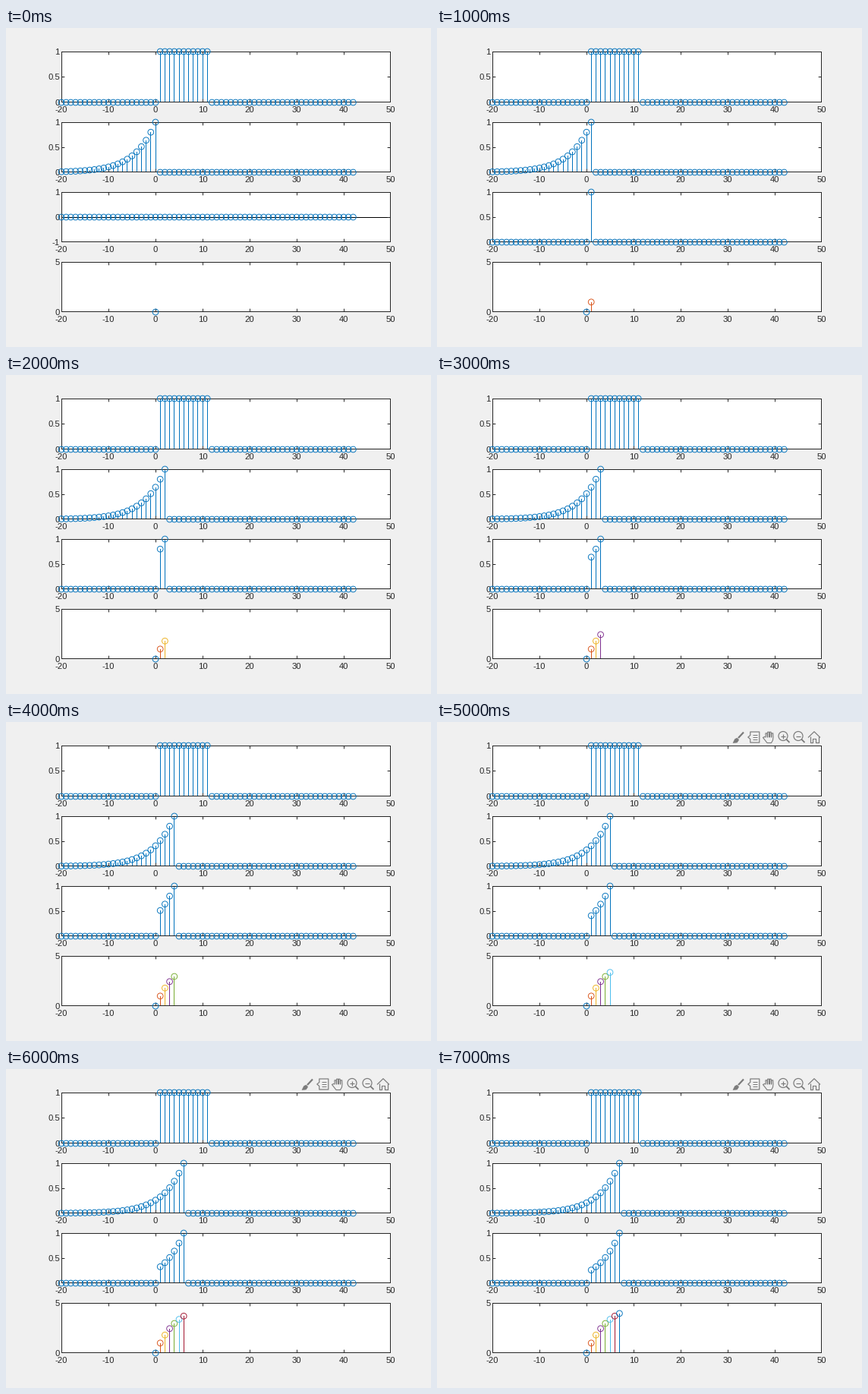
Recreate the animation shown at these times as a matplotlib script. Size 560 by 420 pixels, loop 8000 ms.

```python
import numpy as np
import matplotlib.pyplot as plt
from matplotlib.animation import FuncAnimation
from matplotlib.patches import Circle, Polygon, Rectangle

W, H, DPI = 560, 420, 100
PX = 72 / DPI                     # points per pixel
LEFT, RIGHT = 73, 507             # edges of every plot
STEP = (RIGHT - LEFT) / 70        # pixels per sample
HEIGHT, PITCH, FIRST = 66.22, 92.025, 31.49
TICK = 4.34
INK, BLUE, GRAY = "#262626", "#0072BD", "#7b7b7b"
CYCLE = (BLUE, "#D95319", "#EDB120", "#7E2F8E",
         "#77AC30", "#4DBEEE", "#A2142F")
N = np.arange(-20, 43)
PULSE = ((N >= 1) & (N <= 11)).astype(float)

fig = plt.figure(figsize=(W / DPI, H / DPI), dpi=DPI, facecolor="#f0f0f0")
ax = fig.add_axes([0, 0, 1, 1])


def to_x(n):
    return LEFT + (n + 20) * STEP


def cell(pos, last):
    """Whole pixel that holds a position, at most the last one."""
    return min(int(pos + 1e-6), last)


def box(x, y, w, h, color, z):
    ax.add_patch(Rectangle((x, y), w, h, fc=color, lw=0, snap=False, zorder=z))


def ring(x, y, r, color, width):
    ax.add_patch(Circle((x, y), r, fill=False, ec=color, lw=width * PX,
                        zorder=5))


def label(x, y, text, align):
    ax.text(x, y, text, ha=align, va="baseline", color=INK,
            family="Liberation Sans", size=11.3 * PX, zorder=4)


def path(points, width=1.2, closed=False, fill=False):
    ax.add_patch(Polygon(points, closed=closed, fill=fill, fc=GRAY, ec=GRAY,
                         lw=width * PX, joinstyle="round", zorder=6))


class Panel:
    def __init__(self, index, low, high, ticks):
        top = FIRST + index * PITCH
        self.top, self.bottom = round(top), round(top + HEIGHT)
        self.low, self.high = low, high
        self.frame(ticks)

    def to_y(self, v):
        share = (v - self.low) / (self.high - self.low)
        return self.bottom - share * (self.bottom - self.top)

    def row(self, v):
        return cell(self.to_y(v), self.bottom - 1)

    def frame(self, ticks):
        width, height = RIGHT - LEFT, self.bottom - self.top
        box(LEFT, self.top, width, height, "white", 0)
        box(LEFT, self.row(0), width, 1, "black", 2)
        for y in (self.top, self.bottom - 1):
            box(LEFT, y, width, 1, INK, 3)
        for x in (LEFT, RIGHT - 1):
            box(x, self.top, 1, height, INK, 3)
        for n in range(-20, 51, 10):
            x = cell(to_x(n), RIGHT - 1)
            for y in (self.top, self.bottom - TICK):
                box(x, y, 1, TICK, INK, 3)
            label(to_x(n), self.bottom + 13, str(n), "center")
        for v in ticks:
            for x in (LEFT, RIGHT - TICK):
                box(x, self.row(v), TICK, 1, INK, 3)
            label(70.8, self.to_y(v) + 4, f"{v:g}", "right")

    def stem(self, n, v, color=BLUE):
        x, y, zero = to_x(n), self.to_y(v), self.row(0)
        if zero > y:
            box(cell(x, RIGHT), round(y), 1, zero - round(y), color, 2)
        ring(x, y, 3.88, color, 0.92)

    def stems(self, values):
        for n, v in zip(N, values):
            self.stem(n, v)


def brush(x, y):
    path([(x + 7, y - 6.5), (x, y + 1)], 2.2)
    path([(x - 7, y + 7.5), (x - 4.5, y + 2.5), (x - 1.5, y + 1),
          (x + 0.7, y + 3.5), (x - 1.5, y + 7)], 0.5, True, True)


def data_tip(x, y):
    path([(x - 4.5, y - 7), (x + 7.5, y - 7), (x + 7.5, y + 7),
          (x - 4.5, y + 7), (x - 4.5, y + 2.5), (x - 7.5, y),
          (x - 4.5, y - 2.5)], closed=True)
    for dy in (-3, 0, 3):
        path([(x - 1, y + dy), (x + 5, y + dy)], 1)


def hand(x, y):
    outline = [(x - 2, y + 7.5), (x - 7.5, y + 0.5), (x - 5.5, y - 0.5)]
    for i in range(4):
        fx, tip = x - 4 + 2.6 * i, y - 7 + 0.8 * (i - 1.5) ** 2
        outline += [(fx, y), (fx, tip), (fx + 1.9, tip), (fx + 2.2, y)]
    path(outline + [(x + 5.5, y + 4), (x + 3.5, y + 7.5)], 1.1, True)


def lens(x, y, plus):
    ring(x - 1, y - 1.5, 6, GRAY, 1.2)
    path([(x + 3.3, y + 2.8), (x + 7.5, y + 7)], 1.8)
    path([(x - 4, y - 1.5), (x + 2, y - 1.5)])
    if plus:
        path([(x - 1, y - 4.5), (x - 1, y + 1.5)])


def home(x, y):
    path([(x - 8, y + 0.5), (x, y - 7.3), (x + 8, y + 0.5)])
    for side in (-1, 1):
        path([(x + side * 5.5, y - 1), (x + side * 5.5, y + 7),
              (x + side * 2, y + 7), (x + side * 2, y + 1.5), (x, y + 1.5)])


def toolbar(y=20):
    brush(397, y)
    data_tip(417.3, y)
    hand(437, y)
    lens(457, y, True)
    lens(477, y, False)
    home(497, y)


def draw(shift):
    ax.clear()
    ax.set(xlim=(0, W), ylim=(H, 0))
    ax.axis("off")

    decay = np.where(N <= shift, 0.8 ** np.abs(shift - N), 0)
    unit = (0, 0.5, 1)
    Panel(0, 0, 1, unit).stems(PULSE)
    Panel(1, 0, 1, unit).stems(decay)

    # the product is empty at first, so its scale is symmetric
    low, ticks = (-1, (-1, 0, 1)) if shift == 0 else (0, unit)
    Panel(2, low, 1, ticks).stems(PULSE * decay)

    result = Panel(3, 0, 5, (0, 5))
    for n in range(shift + 1):
        result.stem(n, 5 * (1 - 0.8 ** n), CYCLE[n % len(CYCLE)])

    if shift >= 5:
        toolbar()
    return ()


anim = FuncAnimation(fig, draw, frames=8, interval=1000, init_func=lambda: (),
                     repeat=True, repeat_delay=0)
plt.show()
```
